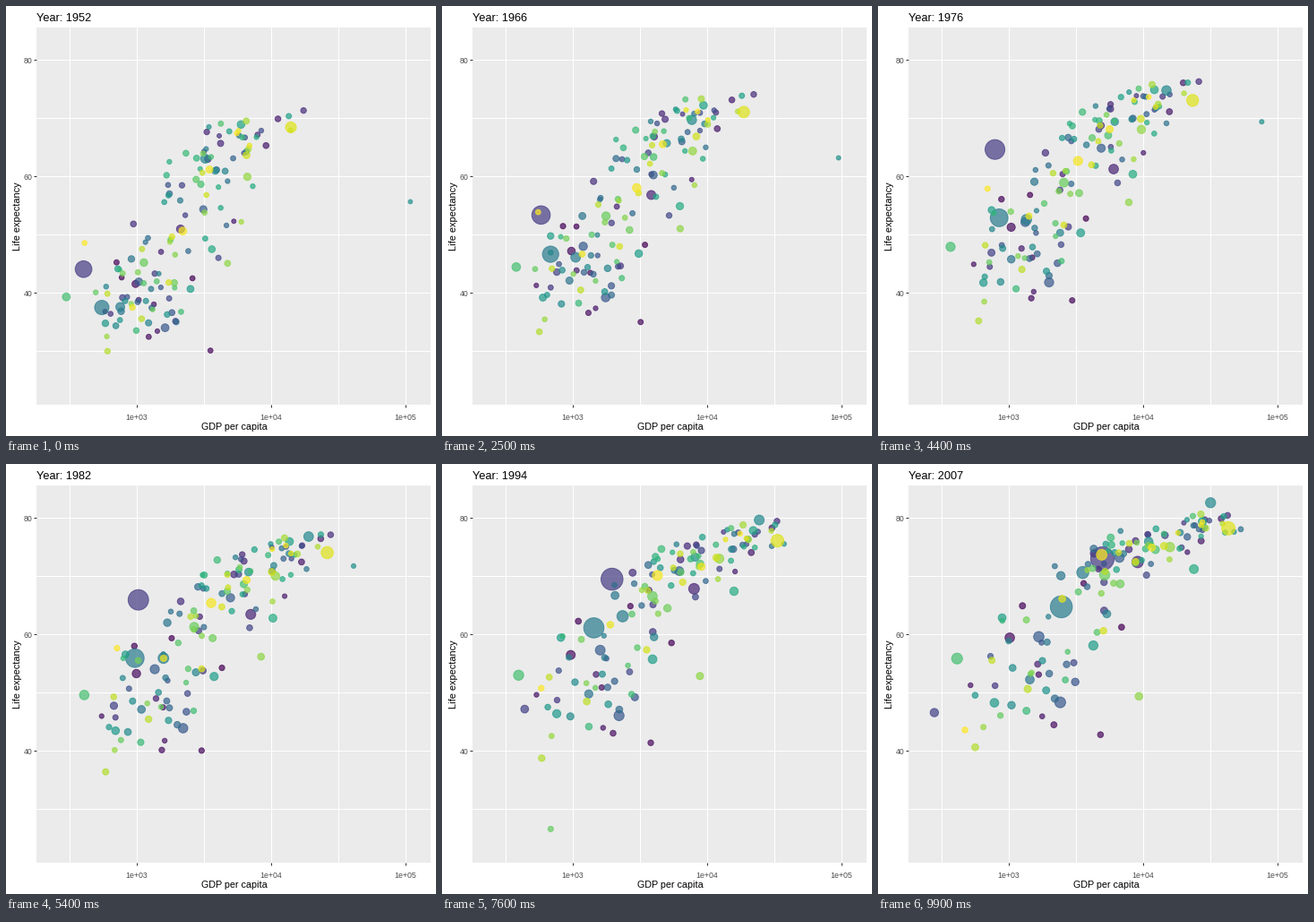
A matplotlib script for the animation above (10000 ms loop, 480 by 480 pixels).

```python
import numpy as np
import matplotlib.pyplot as plt
from matplotlib.animation import FuncAnimation

SIZE, DPI = 480, 72
FRAMES, INTERVAL = 100, 100
FIRST, LAST = 1952, 2007
TOTAL = 142
KEYS = np.linspace(0, 1, 12)
plt.rcParams["font.family"] = "Liberation Sans"

# Pixel position of the 1e3 and 80 grid lines, pixels per decade and per year
X_1E3, DECADE = 146.25, 149.95
Y_80, YEAR = 60.1, 6.49
LEFT, RIGHT, TOP, BOTTOM = 34, 474, 24, 445

# Eye-catching bubbles: colour rank, population in millions at start and end,
# evenly timed path of (gdp, life expectancy)
HEROES = [
    (24, 556, 1319, [(400, 44), (540, 49.5), (700, 64), (1180, 66.6),
                     (2150, 70), (4959, 73)]),
    (58, 372, 1110, [(547, 37.4), (730, 49.5), (1130, 59.5), (2452, 64.7)]),
    (134, 158, 301, [(13990, 68.4), (24800, 73.6), (42952, 78.2)]),
    (71, .2, 2.5, [(108382, 55.6), (93000, 61.3), (100000, 68.3),
                   (29300, 73), (39000, 76), (47307, 77.6)]),
    (107, 2.5, 9, [(493, 40), (520, 44), (780, 45.5), (670, 25), (863, 46)]),
    (66, 86, 127, [(3217, 63), (17990, 76.2), (31656, 82.6)]),
    (14, 57, 190, [(2109, 50.9), (6850, 62.5), (9066, 72.4)]),
    (59, 82, 224, [(750, 37.5), (1450, 54.4), (3541, 70.6)]),
    (3, 4, 12, [(3521, 30), (2890, 39.7), (4797, 42.7)]),
    (27, 14, 65, [(780, 39.1), (735, 47.8), (278, 46.5)]),
    (117, 14, 44, [(4725, 45), (8300, 56.8), (9270, 49.3)]),
    (141, 3, 12, [(407, 48.5), (740, 59), (470, 43.5)]),
]

# Crowds: count, population growth, wealth/life correlation, then at start and
# end: mean and spread of log10(gdp), mean and spread of life expectancy
CROWDS = [
    (46, 3.2, .35, (3.0, .25, 38.5, 4), (3.15, .33, 54.5, 6.5)),
    (24, 3.0, .6, (3.25, .3, 47, 7), (3.88, .42, 71, 4)),
    (24, 2.6, .55, (3.45, .2, 54.5, 7.5), (3.88, .22, 73.3, 2.8)),
    (15, 1.2, .6, (3.6, .2, 63.5, 4), (4.05, .2, 75, 2.2)),
    (21, 1.3, .6, (3.9, .16, 67.5, 3), (4.48, .09, 79.3, 1.2)),
]


def resample(values, at):
    """Piecewise linear reading of evenly spaced values."""
    return np.interp(at, np.linspace(0, 1, len(values)), values)


def radius(pop):
    return 2.25 + 10.9 * np.sqrt(pop / 1319)


def hero(rank, pop0, pop1, path):
    gdp, life = np.array(path, float).T
    return rank, radius(pop0), radius(pop1), np.log10(gdp), life


def crowd(rng, ranks):
    rise = (KEYS + np.sin(KEYS * np.pi / 2)) / 2
    for count, growth, rho, start, end in CROWDS:
        mx, sx, my, sy = (a + (b - a) * k for a, b, k
                          in zip(start, end, (KEYS, KEYS, rise, rise)))
        for _ in range(count):
            a, b, drift = np.clip(rng.normal(size=3), -1.9, 1.9)
            health = rho * a + np.sqrt(1 - rho ** 2) * b
            wealth = a + .4 * drift * (KEYS - .5)
            x = mx + sx * wealth + rng.normal(0, .02, 12)
            y = my + sy * health + rng.normal(0, .3, 12)
            pop = min(np.exp(rng.normal(1.5, 1.1)), 50)
            yield next(ranks), radius(pop), radius(pop * growth), x, y


def build():
    rng = np.random.default_rng(12)
    dots = [hero(*h) for h in HEROES]
    free = np.setdiff1d(np.arange(TOTAL), [d[0] for d in dots])
    dots += crowd(rng, iter(rng.permutation(free)))
    return sorted(dots, key=lambda d: d[0])


def label(x, y, text, size, color="black", **kw):
    """Text with its baseline at pixel (x, y) from the top left."""
    return fig.text(x / SIZE, 1 - y / SIZE, text, fontsize=size,
                    color=color, va="baseline", **kw)


fig = plt.figure(figsize=(SIZE / DPI, SIZE / DPI), dpi=DPI, facecolor="white")
ax = fig.add_axes([LEFT / SIZE, 1 - BOTTOM / SIZE, (RIGHT - LEFT) / SIZE,
                   (BOTTOM - TOP) / SIZE], facecolor="#EBEBEB")
ax.set_xlim(3 + (LEFT - X_1E3) / DECADE, 3 + (RIGHT - X_1E3) / DECADE)
ax.set_ylim(80 - (BOTTOM - Y_80) / YEAR, 80 - (TOP - Y_80) / YEAR)
ax.set_xticks([3, 4, 5], labels=[])
ax.set_yticks([40, 60, 80], labels=[])
ax.tick_params(length=3, width=1, color="#333333")
ax.spines[:].set_visible(False)

for gx in np.arange(2.5, 5.1, .5):
    ax.axvline(gx, color="white", lw=1, zorder=0)
for gy in range(30, 81, 10):
    ax.axhline(gy, color="white", lw=1, zorder=0)

for i in range(3):
    label(146 + 150 * i, 461.5, f"1e+0{i + 3}", 8.8, "#4D4D4D", ha="center")
    label(29.3, 64 + 130 * i, str(80 - 20 * i), 8.8, "#4D4D4D", ha="right")
label(254.5, 473, "GDP per capita", 10.8, ha="center")
label(15.5, 234.5, "Life expectancy", 11, ha="center",
      rotation=90, rotation_mode="anchor")
title = label(34, 17, "", 12.8)

dots = build()
colors = plt.get_cmap("viridis")([d[0] / (TOTAL - 1) for d in dots])
colors[:, 3] = .7
bubbles = ax.scatter(np.full(len(dots), 3), np.full(len(dots), 50), s=20,
                     facecolors=colors, edgecolors=colors,
                     linewidths=1, zorder=3)


def update(frame):
    t = frame / (FRAMES - 1)
    bubbles.set_offsets([(resample(x, t), resample(y, t))
                         for *_, x, y in dots])
    bubbles.set_sizes([(2 * (r0 + (r1 - r0) * t)) ** 2
                       for _, r0, r1, *_ in dots])
    title.set_text(f"Year: {round(FIRST + (LAST - FIRST) * t)}")
    return bubbles, title


anim = FuncAnimation(fig, update, frames=FRAMES, interval=INTERVAL,
                     repeat=True, repeat_delay=0)
plt.show()
```
